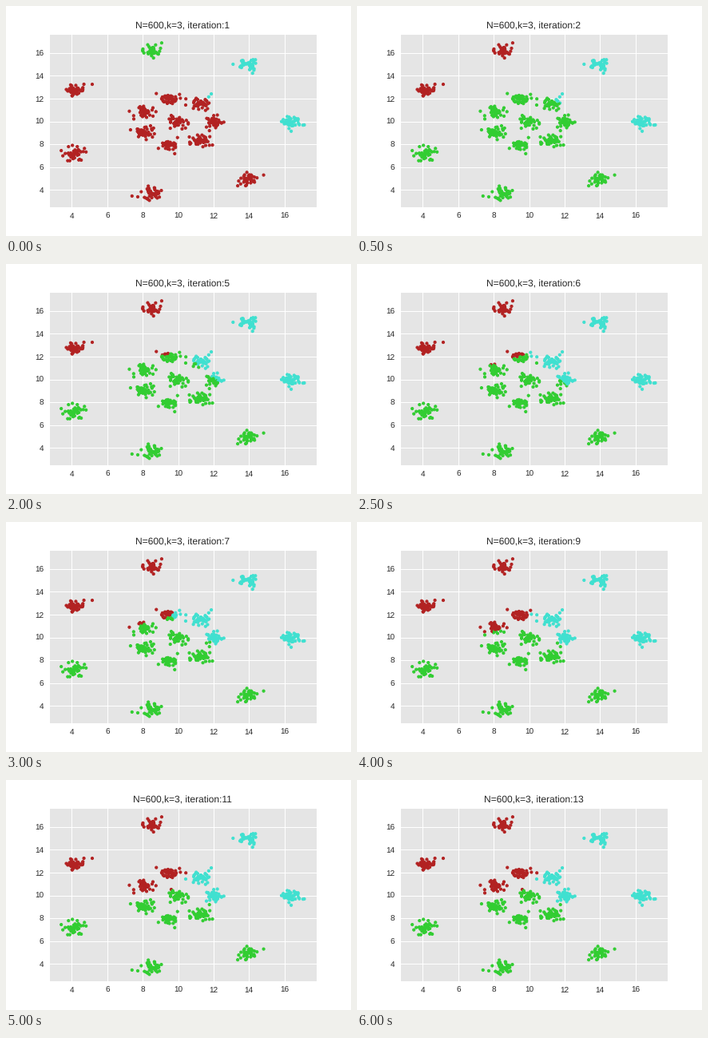
These frames come from a looping animation (432x288 px, 6500 ms). A matplotlib script:

```python
import numpy as np
import matplotlib.pyplot as plt
from matplotlib.animation import FuncAnimation

plt.rcParams.update({"font.family": "Liberation Sans", "text.hinting": "none"})
rng = np.random.default_rng(4)

STEPS = 13
PER_CLUSTER = 40
SPREAD = 0.27
INK = "0.15"
COLOURS = np.array(["firebrick", "limegreen", "turquoise"])

# a few lone points far from their clusters
LONERS = [(11.87, 12.42), (5.15, 13.26), (7.31, 9.27),
          (3.40, 7.45), (17.12, 9.70), (7.72, 3.40)]

# the three group centres (upper left, bottom, right) at key steps
KEY_STEPS = [1, 2, 5, 7, 11]
KEY_CENTRES = np.array([
    [(8.60, 16.20), (8.30, 10.90), (14.00, 15.00)],
    [(8.58, 16.24), (9.29, 9.05), (15.05, 12.45)],
    [(6.42, 14.50), (9.55, 8.45), (14.20, 12.20)],
    [(6.75, 14.25), (9.40, 8.10), (13.40, 11.90)],
    [(7.62, 13.00), (9.43, 7.35), (13.45, 11.67)],
])


def ring(radius, count=7):
    angles = 2 * np.pi * np.arange(count) / count
    return 9.95 + radius * np.column_stack([np.cos(angles), np.sin(angles)])


def make_points():
    """One cluster in the middle and two rings of seven around it."""
    centres = np.vstack([ring(0, 1), ring(2.08), ring(6.42)])
    noise = rng.normal(0, SPREAD, (len(centres), PER_CLUSTER, 2))
    noise -= noise.mean(axis=1, keepdims=True)
    pts = (centres[:, None] + noise).reshape(-1, 2)
    pts[::100] = LONERS
    return pts


def centres_at(step):
    paths = KEY_CENTRES.reshape(len(KEY_STEPS), -1).T
    return np.array([np.interp(step, KEY_STEPS, p) for p in paths]).reshape(3, 2)


def nearest(pts, centres):
    return ((pts[:, None] - centres) ** 2).sum(axis=2).argmin(axis=1)


points = make_points()

fig = plt.figure(figsize=(6, 4), dpi=72, facecolor="white")
ax = fig.add_axes([.125, .125, .775, .755], facecolor="#E5E5E5")
ax.set(xlim=(2.716, 17.81), ylim=(2.486, 17.704),
       xticks=range(4, 17, 2), yticks=range(4, 17, 2))
ax.set_axisbelow(True)
ax.grid(color="white", lw=1)
ax.tick_params(length=0, pad=7, labelsize=10, labelcolor=INK)
for spine in ax.spines.values():
    spine.set(color="white", linewidth=1)

dots = ax.scatter(*points.T, s=10, lw=1)
title = ax.set_title("", fontsize=12, color=INK, pad=6)


def draw(i):
    step = i + 1
    # the first two groups trade colours after the opening step
    palette = COLOURS[[1, 0, 2]] if step == 1 else COLOURS
    dots.set_color(palette[nearest(points, centres_at(step))])
    title.set_text(f"N=600,k=3, iteration:{step}")
    return dots, title


anim = FuncAnimation(fig, draw, frames=STEPS, interval=500,
                     repeat=True, repeat_delay=0, blit=False)
plt.show()
```
